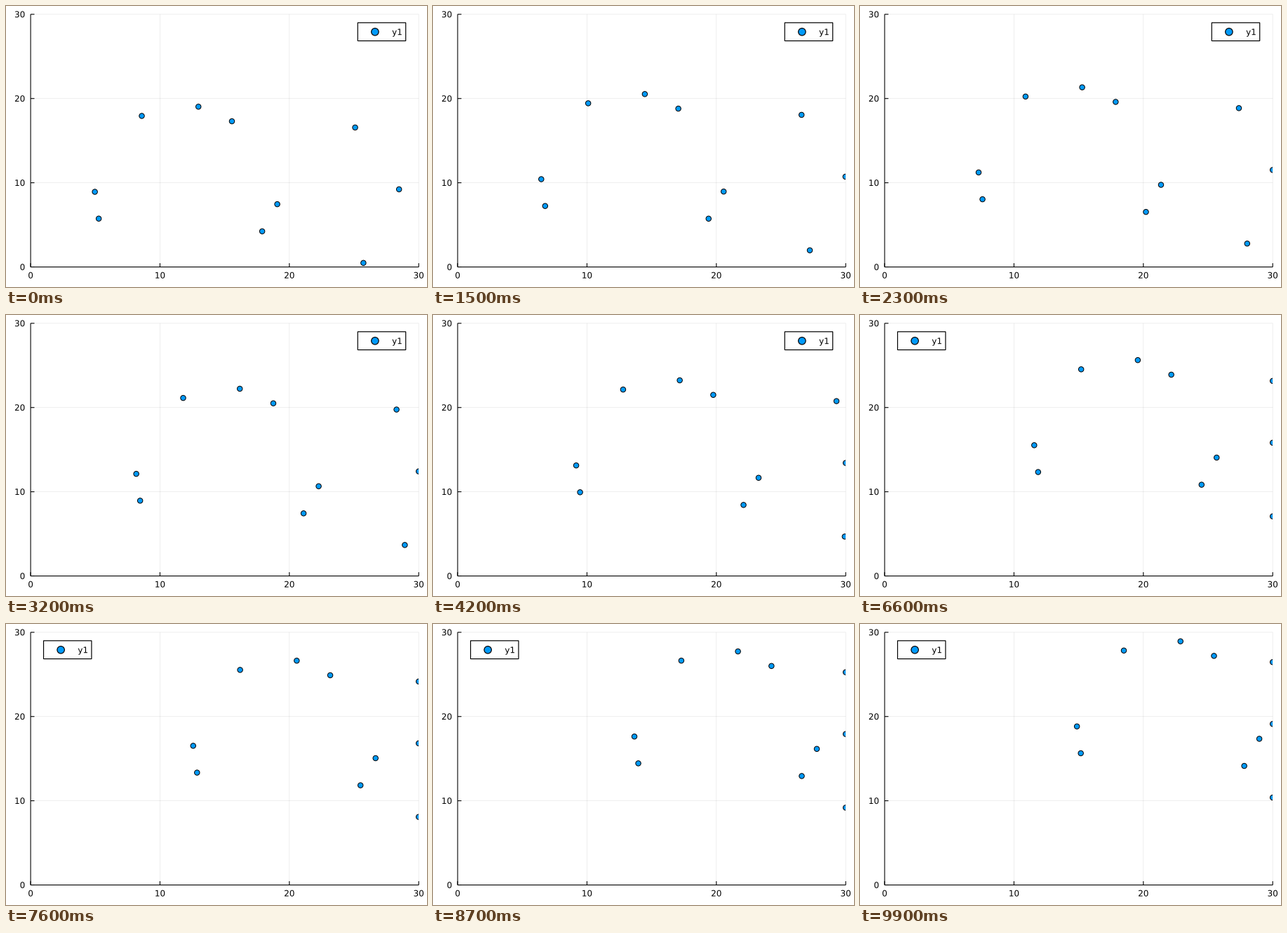
A matplotlib script for the animation above (10000 ms loop, 600 by 400 pixels).

```python
import matplotlib.pyplot as plt
import numpy as np
from matplotlib.animation import FuncAnimation
from matplotlib.patches import Circle, PathPatch, Rectangle
from matplotlib.textpath import TextPath
from matplotlib.transforms import Affine2D

plt.rcParams["font.family"] = "DejaVu Sans"

W, H, DPI = 600, 400, 100
PT = 72 / DPI  # points per pixel
FRAMES, STEP = 100, 0.1
LEFT, RIGHT, TOP, BOTTOM = 35.1, 588.19, 11.81, 371.5
LIMIT = 30
BLUE = "#009AFA"
FONT = 12
DIGIT = 0.636 * FONT  # advance of one digit

START = np.array([
    (4.965, 8.925), (5.265, 5.74), (8.592, 17.935), (12.97, 19.03),
    (15.56, 17.30), (17.90, 4.235), (19.065, 7.455), (25.085, 16.56),
    (28.48, 9.22), (25.725, 0.48),
])


def to_px(x, y):
    return (LEFT + (RIGHT - LEFT) * x / LIMIT,
            BOTTOM - (BOTTOM - TOP) * y / LIMIT)


fig = plt.figure(figsize=(W / DPI, H / DPI), dpi=DPI, facecolor="white")
ax = fig.add_axes([0, 0, 1, 1])
ax.set_xlim(0, W)
ax.set_ylim(H, 0)
ax.axis("off")


def line(x, y, **style):
    style = {"color": "black", "lw": 1.1 * PT, "zorder": 2, **style}
    ax.plot(x, y, solid_capstyle="butt", snap=False, **style)


def label(x, y, text):
    """Draw text as an outline, so it can sit between pixels."""
    patch = PathPatch(TextPath((0, 0), text, size=FONT), fc="black", lw=0,
                      zorder=6, snap=False)
    ax.add_patch(patch)
    move_label(patch, x, y)
    return patch


def move_label(patch, x, y):
    patch.set_transform(Affine2D().scale(1, -1).translate(x, y) + ax.transData)


def circle(radius, width, zorder):
    return ax.add_patch(Circle((0, 0), radius, fc=BLUE, ec="black",
                               lw=width * PT, zorder=zorder))


def draw_axes():
    grid = {"color": "black", "alpha": 0.1, "lw": 0.65 * PT, "zorder": 1}
    for value in range(0, LIMIT + 1, 10):
        x, y = to_px(value, value)
        text = str(value)
        width = DIGIT * len(text)
        if value:
            line([x, x], [TOP, BOTTOM], **grid)
            line([LEFT, RIGHT], [y, y], **grid)
        line([x, x], [BOTTOM, BOTTOM - 5.4])
        line([LEFT, LEFT + 5.4], [y, y])
        label(x - width / 2, 387.6, text)
        label(27.3 - width, y + 4.4, text)
    line([LEFT, LEFT], [TOP, BOTTOM])
    line([LEFT, RIGHT], [BOTTOM, BOTTOM])


draw_axes()

area = Rectangle((LEFT, TOP), RIGHT - LEFT, BOTTOM - TOP,
                 transform=ax.transData)
dots = [circle(3.7, 1.0, 3) for _ in START]
for dot in dots:
    dot.set_clip_path(area)

box = ax.add_patch(Rectangle((0, 23.8), 68.4, 25.8, fc="white", ec="black",
                             lw=1.2 * PT, zorder=4, snap=False))
key = circle(5.2, 1.2, 5)
name = label(0, 0, "y1")


def place_legend(x):
    box.set_x(x)
    key.set_center((x + 24.6, 36.8))
    move_label(name, x + 48.8, 41.2)


def update(i):
    points = np.minimum(START + STEP * i, LIMIT)
    for dot, point in zip(dots, points):
        dot.set_center(to_px(*point))

    # The legend leaves the top right corner once a dot enters it.
    crowded = np.any(np.all(points > 0.75 * LIMIT, axis=1))
    place_legend(53.54 if crowded else 501.3)
    return [*dots, box, key, name]


anim = FuncAnimation(fig, update, frames=FRAMES, interval=100,
                     repeat=True, repeat_delay=0, blit=False)
plt.show()
```
